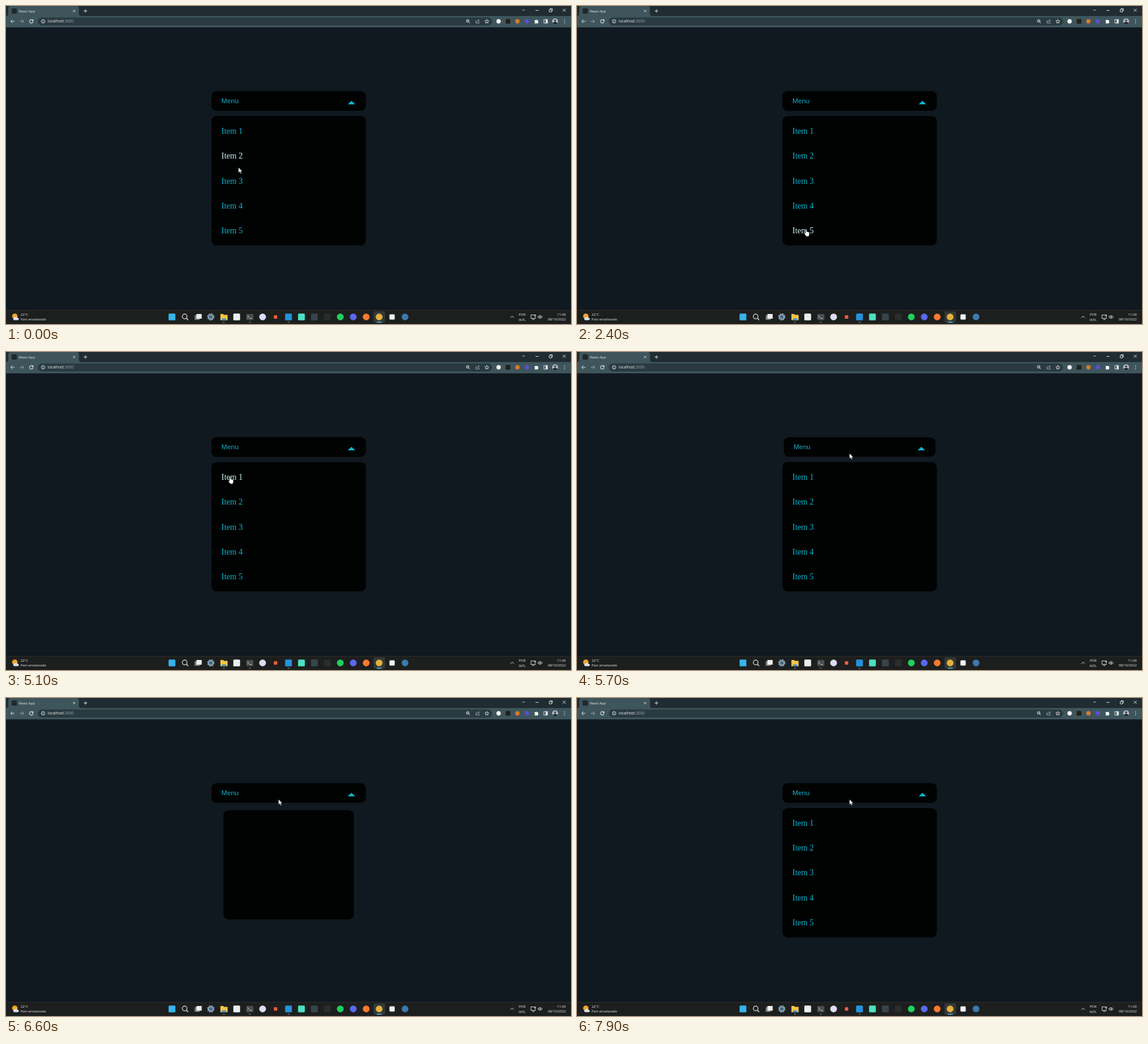
These frames come from a looping animation (960 px wide and 540 px high, 8000 ms). An HTML page:

```html
<!DOCTYPE html>
<html lang="pt">
<head>
<meta charset="utf-8">
<title>Menu</title>
<style>
html, body { margin: 0; width: 100%; height: 100%; overflow: hidden; background: #101820; }
svg { display: block; width: 960px; height: 540px; }
.ui { font: 5.75px "Open Sans", "Noto Sans", sans-serif; fill: #f0f3f3; }
.item { font: 14px "Liberation Serif", "Times New Roman", serif; }
.line { fill: none; stroke: #e4eaeb; stroke-width: .9; }
.dim { stroke: #a3b0b3; }
</style>
</head>
<body>
<svg viewBox="0 0 960 540">
  <defs><clipPath id="clip"><rect id="hole" rx="8.75"/></clipPath></defs>
  <rect width="960" height="540" fill="#101820"/>

  <!-- browser -->
  <rect width="960" height="18" fill="#202c31"/>
  <path d="M0 17Q4 17 4 13V4Q4 0 8 0H120Q124 0 124 4V13Q124 17 128 17H960V36H0Z" fill="#3e555c"/>
  <rect y="35.5" width="960" height=".7" fill="#4a5c62"/>
  <rect x="54" y="19.5" width="772" height="13.5" rx="6.75" fill="#293a40"/>
  <rect x="9.5" y="4" width="9" height="9" rx="1.5" fill="#20282c"/>
  <g class="ui">
    <text x="22" y="10.6">React App</text>
    <text x="71" y="28.3" font-size="6.5" style="font-size:6.5px">localhost<tspan fill="#9eacb0">:3000</tspan></text>
  </g>
  <g class="line">
    <path d="M114 6.7L117.6 10.3M117.6 6.7L114 10.3M132 8.5H138M135 5.5V11.5"/>
    <path d="M877.5 6L879.5 8L881.5 6M899.7 7.5H905M946 4.7L951 9.7M951 4.7L946 9.7"/>
    <path d="M923 6H927V10H923ZM924.5 5.8V4.5H928.3V8.5H927.2"/>
    <path d="M14.5 26H8M11 23L8 26L11 29"/>
    <path class="dim" d="M23.5 26H30M27 23L30 26L27 29"/>
    <path d="M45.4 24.2A3 3 0 1 0 46 26.3M46 22.8V25H43.6" stroke-width="1.1"/>
    <circle cx="63" cy="26" r="3"/>
    <path d="M63 25.5V27.7M63 24V24.8M786.2 27.2L788.2 29.2M783.2 25.3H786"/>
    <circle cx="784.5" cy="25.3" r="2.3"/>
    <path class="dim" d="M798.5 24.5V29H804V27M800 27Q800.5 24.5 803.5 24.5M802.2 22.7L804.3 24.5L802.2 26.3"/>
    <path d="M817 22.8L818 25L820.3 25.2L818.6 26.8L819.1 29.1L817 27.9L814.9 29.1L815.4 26.8L813.7 25.2L816 25Z"/>
    <rect x="914" y="23" width="6" height="6"/>
  </g>
  <circle cx="837" cy="26" r="3.7" fill="#f2f2f2"/>
  <rect x="849" y="22" width="8" height="8" rx="1" fill="#25211b"/>
  <circle cx="869" cy="26" r="3.7" fill="#d9792b"/>
  <circle cx="885" cy="26" r="3.7" fill="#5a4fd0"/>
  <path d="M898 24H900A1.2 1.2 0 0 1 902.3 24H904V26A1.2 1.2 0 0 1 904 28V29.5H898V28A1 1 0 0 0 898 26Z" fill="#f4f6f6"/>
  <rect x="917" y="23" width="3" height="6" fill="#f0f3f3"/>
  <circle cx="933" cy="26" r="5" fill="#b9bfc8"/>
  <path d="M929 29Q929.5 27 933 27T937 29A5 5 0 0 1 929 29Z" fill="#20242e"/>
  <circle cx="933" cy="24.6" r="2" fill="#59484a"/>
  <path d="M949 22.8v1.2m0 1.4v1.2m0 1.4v1.2" stroke="#e8eded" stroke-width="1.2"/>

  <!-- dropdown -->
  <g id="button">
    <rect x="349" y="144.5" width="262.4" height="33.5" rx="8.75" fill="#010302"/>
    <text x="366" y="165" fill="#16adc8" style="font:11.67px 'Liberation Sans',Arial,sans-serif">Menu</text>
    <path id="arrow" d="M-6.3-4.5H6.3L0 1.6Z" fill="#0cb5cf"/>
  </g>
  <g clip-path="url(#clip)">
    <rect x="349" y="187" width="263" height="220" fill="#010302"/>
    <g id="items"></g>
  </g>

  <!-- taskbar -->
  <rect y="516" width="960" height="24" fill="#1d1f1e"/>
  <rect y="516" width="960" height=".6" fill="#363a3a"/>
  <circle cx="15" cy="526.8" r="4.6" fill="#f3a52c"/>
  <path d="M14 533.5A2.3 2.3 0 0 1 14.3 529A3 3 0 0 1 19.5 529.5A2 2 0 0 1 20 533.5Z" fill="#d8e0ea"/>
  <g class="ui">
    <text x="25" y="526">22°C</text>
    <text x="25" y="534">Parc ensolarado</text>
    <g text-anchor="middle"><text x="877" y="526.4">POR</text><text x="877" y="534.6">INTL</text></g>
    <g text-anchor="end"><text x="951" y="526.2">11:00</text><text x="951" y="534.4">08/10/2022</text></g>
  </g>
  <rect x="624.5" y="518.5" width="19.5" height="19" rx="2" fill="#343838"/>
  <g id="apps"></g>
  <circle cx="303.6" cy="527.2" r="4" class="line" style="stroke-width:1.2"/>
  <path d="M306.6 530.2L309.5 533.2" class="line" style="stroke-width:1.3"/>
  <rect x="320.5" y="525" width="8.5" height="8" fill="#777b7c"/>
  <rect x="323.5" y="523" width="9" height="8" fill="#eceeee"/>
  <circle cx="348" cy="528" r="3.8" fill="none" stroke="#8299aa" stroke-width="3"/>
  <circle cx="348" cy="528" r="5.5" fill="none" stroke="#8299aa" stroke-width="1.6" stroke-dasharray="2.2 2.12"/>
  <circle cx="348" cy="528" r="1.5" fill="#3d9be0"/>
  <path d="M364.3 523H369L370.5 524.5H376.5V533.5H364.3Z" fill="#f5c544"/>
  <rect x="367" y="530.5" width="7" height="3" fill="#3b8fd8"/>
  <rect x="408.3" y="523" width="12" height="10.5" rx="1" fill="#4a4e50"/>
  <path d="M410.3 525.5L412.5 527.7L410.3 529.9M414 530.5H417.5" class="line"/>
  <path d="M368.7 537H371.7M412.7 537H415.7M478.7 537H481.7" stroke="#9a9fa0" stroke-width="1.2"/>
  <path d="M630.5 537H638" stroke="#4cc2f0" stroke-width="1.4" stroke-linecap="round"/>
  <g class="line">
    <path d="M857 529.5L860 526.5L863 529.5"/>
    <path d="M897.5 524.5H892V530.5H899.5V528.5M894 532.3H898M898 524.5H900V527H898Z"/>
    <path d="M904 527H905.5L907.5 525V531L905.5 529H904ZM908.7 526.7Q909.8 528 908.7 529.3"/>
    <path class="dim" d="M910 525.5Q912 528 910 530.5"/>
  </g>

  <g id="cursor">
    <path id="pointer" d="M0 0V9.2L2.1 7.3L3.6 10.6L5.2 9.9L3.7 6.8H6.5Z" fill="#fff" stroke="#111" stroke-width=".5"/>
    <path id="hand" d="M1 .8Q1.9-.3 2.8.8V4Q4 3.5 4.6 4.4Q5.8 4 6.3 4.9Q7.8 4.7 7.8 6V8.5Q7.8 11.8 5.5 12H3.2Q1.8 11.5-.6 7.8Q-.9 6.5.4 6.8L1 7.3Z" fill="#fff" stroke="#111" stroke-width=".5"/>
  </g>
</svg>
<script>
const $ = id => document.getElementById(id);
const NS = "http://www.w3.org/2000/svg";
const LOOP = 8000, STEP = 100, SLOW = 1500;
const CLOSE = 5720, OPEN = 6222, PRESS = 130;

function add(parent, name, attrs) {
  const el = document.createElementNS(NS, name);
  for (const key in attrs) el.setAttribute(key, attrs[key]);
  return parent.appendChild(el);
}

// taskbar icons: x, colour, round?
[
  [282, "#35b4ea"], [392, "#e9eef0"], [436, "#dcdcf6", 1], [458, "#ee5a3c"],
  [480, "#2492dc"], [502, "#4be0c0"], [524, "#38444c"], [546, "#2b2d2d"],
  [568, "#1fd15f", 1], [590, "#5a68ee", 1], [612, "#fa7a30", 1],
  [634, "#e3b13c", 1], [656, "#f1f1f1"], [678, "#3c79ad", 1]
].forEach(([x, fill, round]) => {
  const w = x === 458 ? 6 : x === 656 ? 9 : 11.5;
  add($("apps"), "rect", { x: x - w / 2, y: 528 - w / 2, width: w, height: w, rx: round ? w / 2 : 1.5, fill });
});

const items = [1, 2, 3, 4, 5].map(n => {
  const el = add($("items"), "text", { x: 366, class: "item" });
  el.textContent = "Item " + n;
  return el;
});

const clamp = v => Math.min(1, Math.max(0, v));
const smooth = v => { v = clamp(v); return v * v * (3 - 2 * v); };
// remaining distance of a critically damped spring
const rest = x => x <= 0 ? 1 : (1 + x) * Math.exp(-x);
// remaining distance of a spring with stiffness 300, damping 24
function bounce(s) {
  if (s <= 0) return 1;
  const w = 12.49;
  return Math.exp(-12 * s) * (Math.cos(w * s) + 12 / w * Math.sin(w * s));
}

const path = [
  [0, 395, 274], [700, 393, 316], [1400, 389, 360], [2000, 387, 384],
  [2500, 387, 378], [3500, 387, 292], [4200, 384, 256], [5100, 378.5, 212],
  [5550, 463, 172], [LOOP, 463, 172]
];
function mouse(t) {
  t = Math.max(0, t);
  const i = path.findIndex(p => p[0] > t);
  const [t0, x0, y0] = path[i - 1], [t1, x1, y1] = path[i];
  const k = (t - t0) / (t1 - t0);
  return [x0 + (x1 - x0) * k, y0 + (y1 - y0) * k];
}
const hovered = t => Math.floor((mouse(t)[1] - 191.4) / 42.25);

function tapped(t, up) {
  if (t < up - PRESS) return 0;
  const down = s => 1 - rest(28 * s / SLOW);
  return t < up ? down(t - up + PRESS) : down(PRESS) * rest(28 * (t - up) / SLOW);
}

function draw(t) {
  const opening = t >= OPEN;
  const s = (t - (opening ? OPEN : CLOSE)) / SLOW;

  const q = opening ? rest(13.2 * s) : 1 - rest(30.8 * s);
  const hole = { x: 349 + 131.2 * q, y: 187 + 21.96 * q, width: 262.4 * (1 - q), height: 219.6 * (1 - q) };
  for (const key in hole) $("hole").setAttribute(key, hole[key]);

  const turn = opening ? smooth(s / .2) : 1 - smooth(s / .2);
  $("arrow").setAttribute("transform", `translate(587 162.5) rotate(${180 * turn})`);
  const scale = 1 - .03 * (tapped(t, CLOSE) + tapped(t, OPEN));
  $("button").setAttribute("transform", `translate(480.2 161.25) scale(${scale}) translate(-480.2 -161.25)`);

  items.forEach((el, i) => {
    const away = opening ? bounce(s - .3 - .05 * i) : smooth(s / .2);
    const lit = [0, 100, 200].filter(d => hovered(t - d) === i).length / 3;
    const mix = (a, b) => Math.round(a + (b - a) * lit);
    el.setAttribute("y", 217 + 42.25 * i + 17.5 * away);
    el.setAttribute("opacity", clamp(1 - away));
    el.setAttribute("fill", `rgb(${mix(10, 205)},${mix(181, 243)},${mix(208, 245)})`);
  });

  const [x, y] = mouse(t);
  const row = hovered(t);
  const onText = row >= 0 && row < 5 && x < 403 && Math.abs(y - 212.5 - 42.25 * row) < 8;
  $("cursor").setAttribute("transform", `translate(${x} ${y})`);
  $("hand").style.display = onText ? "" : "none";
  $("pointer").style.display = onText ? "none" : "";
}

function tick() {
  draw(Math.floor(performance.now() % LOOP / STEP) * STEP);
  requestAnimationFrame(tick);
}
tick();
</script>
</body>
</html>
```
